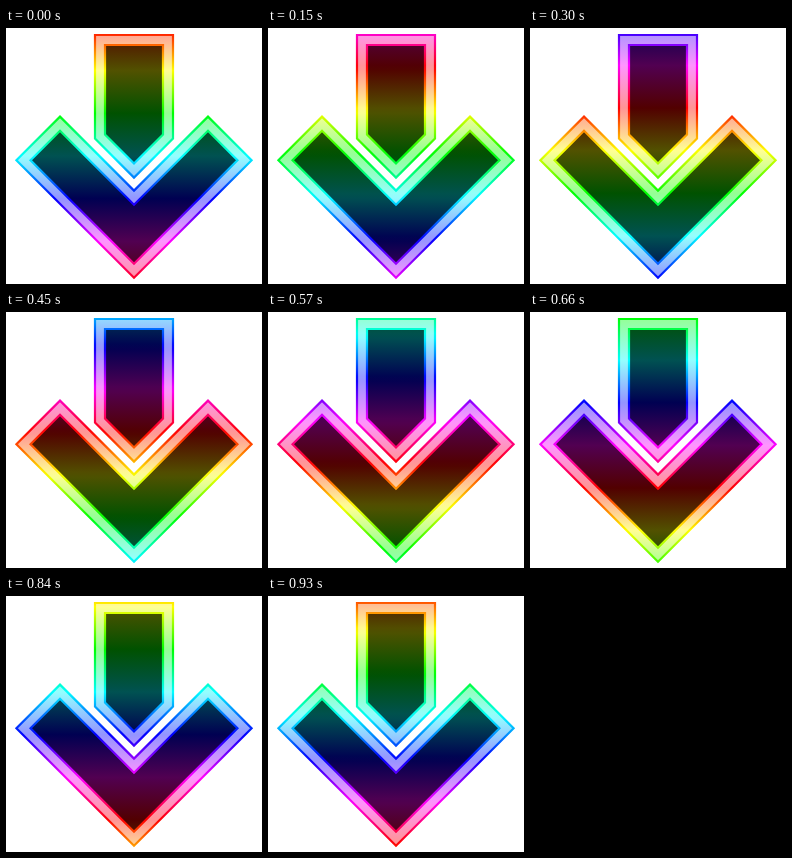
Recreate the animation shown at these times as an HTML page with a canvas. Size 256 by 256 pixels, loop 960 ms.

```html
<!DOCTYPE html>
<html lang="en">
<head>
<meta charset="utf-8">
<title>Rainbow arrow</title>
<style>
  html, body { margin: 0; width: 100%; height: 100%; overflow: hidden; background: #fff; }
  canvas { display: block; width: 256px; height: 256px; }
</style>
</head>
<body>
<canvas id="stage" width="256" height="256"></canvas>
<script>
const SIZE = 256, MID = 128, STEP = 30, STEPS = 32;
const ctx = document.getElementById('stage').getContext('2d');

// Right half of each outline, mirrored around the middle column.
function outline(half) {
  const path = new Path2D();
  half.forEach(([x, y]) => path.lineTo(MID + x, y));
  half.slice().reverse().forEach(([x, y]) => path.lineTo(MID - x, y));
  path.closePath();
  return path;
}

// inset: distance of the outline from the outer edge
function shaft(inset) {
  const w = 39 - inset, tip = 149.6 - inset * Math.SQRT2;
  return outline([[0, tip], [w, tip - w], [w, 7 + inset]].reverse());
}

function chevron(inset) {
  const d = inset * Math.SQRT2;
  return outline([[0, 162.6 + d], [74, 88.6 + d], [117.6 - d, 132.2], [0, 249.8 - d]]);
}

const shapes = [shaft, chevron].map(make => ({ outer: make(0), inner: make(10) }));

function rainbow(shift, light) {
  const g = ctx.createLinearGradient(0, 0, 0, SIZE);
  for (let i = 0; i <= 48; i++) {
    const hue = ((i / 48 - shift) * 360 + 360) % 360;
    g.addColorStop(i / 48, `hsl(${hue}, 100%, ${light}%)`);
  }
  return g;
}

function draw(time) {
  const shift = Math.floor(time / STEP) % STEPS / STEPS;
  const pale = rainbow(shift, 79), dark = rainbow(shift, 16);
  ctx.clearRect(0, 0, SIZE, SIZE);
  ctx.strokeStyle = rainbow(shift, 50);
  ctx.lineWidth = 2.2;
  for (const { outer, inner } of shapes) {
    ctx.fillStyle = pale;
    ctx.fill(outer);
    ctx.fillStyle = dark;
    ctx.fill(inner);
    ctx.stroke(outer);
    ctx.stroke(inner);
  }
}

const start = performance.now();
function tick() {
  draw(performance.now() - start);
  requestAnimationFrame(tick);
}
tick();
</script>
</body>
</html>
```
